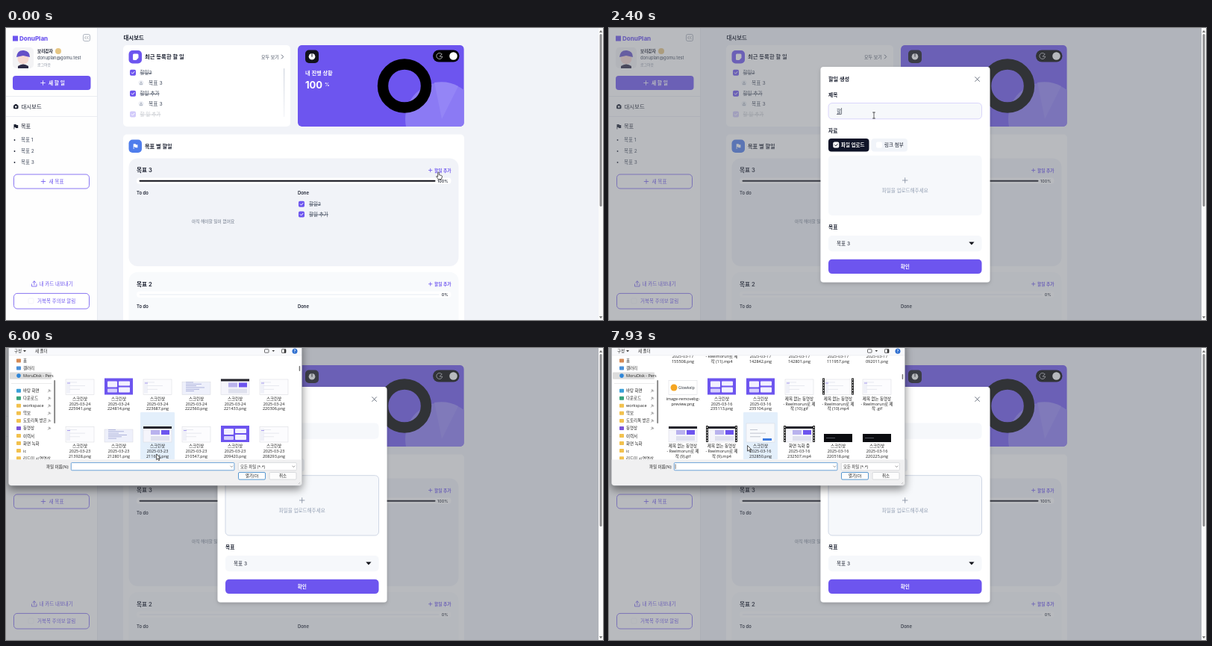
Write an HTML page that moves like this. It is 800x391 px and loops after 8000 ms.

```html
<!DOCTYPE html>
<html lang="ko">
<head>
<meta charset="utf-8">
<title>할일 추가</title>
<style>
  html, body { margin: 0; width: 100%; height: 100%; overflow: hidden; background: #f1f3f8; }
  svg { display: block; width: 100%; height: 100%; }
  text { font-family: Inter, "Noto Sans CJK KR", "Noto Sans CJK", sans-serif; white-space: pre; }
  #dialog text { font-family: "Open Sans", "Noto Sans CJK KR", "Noto Sans CJK", sans-serif; }
  .strike { text-decoration: line-through; }
  #modal { transform-origin: 397px 196px; }
</style>
</head>
<body>
<svg id="stage" viewBox="0 0 800 391" preserveAspectRatio="none"></svg>
<script>
const PURPLE = '#6d55ef', INK = '#1b2030', SLATE = '#3c4658', MUTED = '#94a0b4', FIELD = '#f6f8fb';
const LOOP = 8000, ROW = 63.5, COL = 52;

// Drawing helpers; text is placed by its vertical centre.
const rect = (x, y, w, h, r, fill, extra = '') =>
  `<rect x="${x}" y="${y}" width="${w}" height="${h}" rx="${r}" fill="${fill}" ${extra}/>`;
const circle = (x, y, r, fill, extra = '') =>
  `<circle cx="${x}" cy="${y}" r="${r}" fill="${fill}" ${extra}/>`;
const fillPath = (d, fill, extra = '') => `<path d="${d}" fill="${fill}" ${extra}/>`;
const line = (d, stroke, w = 0.8, extra = '') =>
  `<path d="${d}" fill="none" stroke="${stroke}" stroke-width="${w}" stroke-linecap="round" stroke-linejoin="round" ${extra}/>`;
const text = (x, y, s, size, fill = INK, weight = 400, extra = '') =>
  `<text x="${x}" y="${y + size * 0.37}" font-size="${size}" fill="${fill}" font-weight="${weight}" ${extra}>${s}</text>`;
const middle = 'text-anchor="middle"';
const outline = (c, w = 0.8) => `stroke="${c}" stroke-width="${w}"`;
const plus = (x, y, c, r = 2.8) => line(`M${x - r} ${y}h${2 * r}M${x} ${y - r}v${2 * r}`, c);
const check = (x, y, size = 8) =>
  rect(x - size / 2, y - size / 2, size, size, 1.8, PURPLE) +
  line(`M${x - 1.8} ${y}l1.4 1.4 2.4-2.7`, '#fff', 1);
const flag = (x, y, c) => fillPath(`M${x - 2.5} ${y - 3}h3l.5 1h2.2v4h-3l-.5-1h-1.4v2.6h-.8z`, c);

function sidebar() {
  const goals = [1, 2, 3].map((n, i) =>
    circle(11.5, 150 + 15 * i, 0.9, INK) + text(20, 150 + 15 * i, '목표 ' + n, 6.5, SLATE)).join('');
  return rect(0, 0, 122, 391, 0, '#fefefe') + rect(122, 0, 0.7, 391, 0, '#e2e6ee') +
    rect(9, 10.5, 7, 7, 0, PURPLE) + text(18, 13.8, 'DonuPlan', 8, PURPLE, 800) +
    rect(103.5, 8.5, 9, 9, 2, '#fff', outline('#8d95a5', 0.7)) +
    line('M107.5 11l-2 2 2 2M110.5 11l-2 2 2 2', '#6b7280', 0.6) +
    rect(9, 26, 28, 28, 5, '#f3f3f5') + circle(23, 41, 7.5, '#f6d9d2') +
    fillPath('M14 39q1-10 10-9q8 1 8 9l-9-2z', '#6350c8') + fillPath('M16 51q7-5 14 0v3h-14z', '#2d2a45') +
    text(42, 30.5, '보리감자', 5.6, INK, 600) + circle(70, 31, 4, '#e6c684') +
    text(42, 40, 'donuplan@gomu.test', 5.8, SLATE) + text(42, 49, '로그아웃', 4.9, '#8b93a3') +
    rect(9, 64, 104.5, 19, 4, PURPLE) + plus(49.5, 73.5, '#fff') + text(57, 73.5, '새 할 일', 6.7, '#fff', 600) +
    rect(0, 91, 122, 0.8, 0, '#e6e9ef') + rect(0, 118, 122, 0.8, 0, '#e6e9ef') +
    rect(10, 103, 6.5, 5.3, 1.5, INK) + rect(11.6, 102, 3.3, 2, 0.7, INK) + circle(13.2, 105.5, 1.3, '#fff') +
    text(20.5, 105, '대시보드', 7.4, INK, 500) +
    flag(13, 132, INK) + text(20, 131.8, '목표', 7.2, INK, 500) + goals +
    rect(10.5, 196, 101, 19, 4.5, '#fff', outline(PURPLE)) + plus(50, 205.5, PURPLE) +
    text(57.5, 205.5, '새 목표', 6.6, PURPLE, 500) +
    line('M34.5 343v3h6.5v-3M37.8 344v-5M35.7 341l2.1-2.1 2.1 2.1', PURPLE) +
    text(44.5, 342.5, '내 카드 내보내기', 6.5, PURPLE, 500) +
    rect(10.5, 355.4, 101, 20.6, 4.5, '#fff', outline(PURPLE)) + rect(30, 362, 7, 7, 1.5, '#fff', outline('#eceff5', 0.6)) +
    text(42, 365.5, '거북목 주의보 알림', 6.5, PURPLE, 500);
}

function recentCard() {
  const task = (y, s) => check(170, y) + text(179.5, y, s, 6.55, SLATE, 400, 'class="strike"');
  const goal = y => circle(181, y, 3.6, '#eef0f5') + line(`M179.5 ${y + 1.5}l1.5-3.3 1.5 3.3z`, '#8b95a7', 0.6) +
    text(191, y, '목표 3', 6.8, SLATE);
  return rect(157, 23, 224, 109, 5, '#fff') + rect(164.5, 30, 17.5, 17.5, 5, PURPLE) +
    fillPath('M170 36q0-1.5 1.5-1.5h4.5q1.5 0 1.5 1.5v4l-3 3h-3q-1.5 0-1.5-1.5z', '#fff') +
    text(186, 38.3, '최근 등록한 할 일', 7.35, INK, 600) +
    text(342, 38.5, '모두 보기', 6, SLATE, 500) + line('M369.3 36l2.4 2.5-2.4 2.5', SLATE) +
    task(59.8, '할일2') + goal(73.6) + task(87.8, '할일 추가') + goal(101.6) +
    `<g opacity=".3">${task(115.6, '할 일 추가')}</g>` +
    rect(372, 54, 1.2, 65, 0.6, 'url(#bar)');
}

function progressCard() {
  return `<g clip-path="url(#card)">` + rect(391, 23, 223, 109, 5, PURPLE) +
    circle(584, 122, 49, '#8b7af4') + fillPath('M584 122L574 73Q592 70 606 78z', '#9485f6') + '</g>' +
    rect(401, 29.5, 18, 17.5, 5, '#12121c') + circle(410, 38.3, 4.3, '#fff') + line('M410 38.3v-4', '#12121c', 1) +
    text(401, 60, '내 진행 상황', 7.2, '#fff', 600) +
    text(401, 76, '100', 13, '#fff', 700) + text(427, 75.5, '%', 6.6, '#fff', 600) +
    circle(534, 77.5, 29, 'none', outline('#000', 14.4)) +
    rect(572, 29.5, 35.5, 16, 8, '#000') + circle(599.5, 37.5, 5.3, '#fff') +
    line('M584 35a4 4 0 1 0 .8 3.2h-3.6l2.8-3.2', '#e8e8ee', 0.7);
}

function goalPanel(y, h, title, percent, fill) {
  const done = percent === 100;
  return rect(164.5, y, 442, h, 12, fill) + text(175, y + 16, title, 7.6, INK, 600) +
    plus(568.7, y + 16, PURPLE, 2.2) + text(574, y + 16, '할일 추가', 5.7, PURPLE, 600) +
    rect(175, y + 26, 421.5, 8.3, 4.1, '#fff') +
    rect(178.5, y + 29.2, done ? 397 : 402, 2, 1, done ? '#0c0c16' : '#f3f5f9') +
    text(592.5, y + 30.1, percent + '%', 5.4, INK, 500, 'text-anchor="end"') +
    text(175, y + 46, 'To do', 5.9, INK, 600) + text(391, y + 46, 'Done', 5.9, INK, 600);
}

function goalsCard() {
  const task = (y, s) => check(396, y) + text(406, y, s, 6.5, SLATE, 400, 'class="strike"');
  return rect(157, 142.5, 457, 260, 5, '#fff') + rect(164.5, 149.5, 17.5, 17.5, 5, '#4f7dec') + flag(173.2, 158.3, '#fff') +
    text(186, 158, '목표 별 할일', 7.2, INK, 600) +
    goalPanel(174.5, 144.5, '목표 3', 100, '#f1f3f8') +
    text(249, 258.8, '아직 해야할 일이 없어요', 5.7, '#6a7486') +
    task(235.8, '할일2') + task(249.6, '할일 추가') +
    goalPanel(326.8, 90, '목표 2', 0, '#f8fafc');
}

function modal() {
  const label = (y, s) => text(294, y, s, 6.7, INK, 600);
  return rect(283.5, 52, 227, 288.6, 4, '#fff', 'filter="url(#soft)"') + text(294, 68.5, '할일 생성', 7.2, INK, 700) +
    line('M490.7 65.7l5.8 5.8M496.5 65.7l-5.8 5.8', '#4a5262') +
    label(90, '제목') + rect(294, 100.5, 205.5, 21.3, 5, FIELD, 'id="field"') +
    text(305, 111.3, '', 6.55, MUTED, 400, 'id="entry"') +
    rect(0, 107, 0.6, 8.5, 0, INK, 'id="caret"') + rect(305, 115.2, 6, 0.6, 0, INK, 'id="compose"') +
    label(138, '자료') + rect(294, 148, 54.5, 17.5, 4, '#0f1428') + rect(300.3, 152.6, 8, 8, 2, '#fff') +
    line('M302.5 156.6l1.4 1.5 2.4-2.9', '#0f1428', 0.9) + text(311, 156.6, '파일 업로드', 6.5, '#fff', 600) +
    rect(351.5, 148, 48.5, 17.5, 4, '#f1f4f9') + rect(358, 152.6, 8, 8, 2, '#fff') + text(369, 156.6, '링크 첨부', 6.5, INK, 500) +
    rect(294, 170.7, 205.5, 80.3, 5, FIELD, 'id="drop"') + plus(396.7, 204, '#7b8699', 3.3) +
    text(396.7, 218, '파일을 업로드해주세요', 6.55, MUTED, 500, middle) +
    label(267, '목표') + rect(294, 278, 205.5, 21.3, 5, FIELD) + text(305, 288.5, '목표 3', 6.6, INK) +
    fillPath('M482.3 286.6h7.2l-3.6 4z', '#0d0f18') +
    rect(294, 309.8, 205.5, 19.3, 5, PURPLE, 'id="submit"') + text(396.7, 319.4, '확인', 6.6, '#fff', 600, middle);
}

// File rows: "kind day time", or "kind clip suffix" for exported videos.
const fileRows = [
  null, null,
  'shot 22 163718,shot 22 143153,shot 21 180939,shot 21 170152,shot 21 143538,shot 21 140340',
  'poster 21 135738,shot 21 024749,pdf,shot 20 191040,strip 20 185904,dense 20 185855',
  'shot 20 185152,shot 20 182602,black 20 174617,pink 20 145903,poster 20 140602,notes 18 173734',
  null, null, null,
  'shot 17 155508,film clip (11).mp4,shot 17 142842,shot 17 142801,shot 17 111957,shot 17 092011',
  'logo,violet 16 235113,violet 16 235104,shot clip (10).gif,film clip (10).mp4,shot clip .gif',
  'app clip (9).gif,appfilm clip (9).mp4,prompt 16 232850,appfilm rec 232507,dark 16 220518,dark 16 220225',
];
const fillerRow = r => Array.from({ length: 6 }, (_, c) =>
  `${['shot', 'violet', 'shot', 'dense', 'app'][(r * 2 + c) % 5]} ${r < 2 ? 24 - r : 18} ${225941 - r * 12013 - c * 1127}`).join();

function thumb(kind, x, y) {
  const box = (w, h, fill, extra = '') => rect(x - w / 2, y - h, w, h, 0, fill, extra);
  const edge = outline('#d5d8de', 0.5);
  const lines = (n, c) => Array.from({ length: n }, (_, i) =>
    rect(x - 14, y - 17 + i * 14 / n, 10 + (i * 11) % 18, 0.9, 0, c)).join('');
  const app = box(38, 21, '#f5f5fb', edge) + rect(x - 19, y - 21, 38, 3, 0, '#25252c') +
    rect(x - 9, y - 16, 12, 6, 0, '#b9b2ee') + rect(x + 5, y - 16, 11, 6, 0, PURPLE) + rect(x - 9, y - 8, 25, 6, 0, '#dfe1ee');
  const film = inner => inner + [-21, 18].map(dx => rect(x + dx, y - 22, 3, 22, 0, '#222') +
    line(`M${x + dx + 1.5} ${y - 20.5}v19.5`, '#eee', 1.2, 'stroke-dasharray="1 2.6"')).join('');
  const shot = box(38, 20.5, '#fcfcfe', edge) + rect(x - 18, y - 18, 5, 16, 0, '#f0f1f8') +
    lines(3, '#e4e6ee') + rect(x - 17, y - 16, 4, 1, 0, '#a99cf0');
  switch (kind) {
    case 'poster': return box(29, 38, '#a98a5e') + rect(x - 12, y - 35, 14, 4, 0, '#4c4038') +
      fillPath(`M${x - 14} ${y - 15}l13-11 15 9-13 12z`, '#59677f') + fillPath(`M${x - 10} ${y - 15}l9-7 9 6-9 8z`, '#cfbd93') +
      rect(x - 13, y - 6, 26, 4, 0, '#6f4c38') + circle(x + 9, y - 30, 3, '#b9654a');
    case 'pdf': return fillPath(`M${x - 14} ${y - 38}h20l8 8v30h-28z`, '#f7f7f8', edge) + circle(x, y - 19, 11, '#dd5144') +
      rect(x - 10, y - 16, 20, 8, 1, '#3b3b3f') + text(x, y - 12, 'PDF', 7, '#fff', 700, middle);
    case 'strip': return box(38, 6, '#f5f6fa', edge);
    case 'black': return box(38, 5, '#111');
    case 'dark': return box(38, 11, '#0b0c10') + rect(x - 16, y - 6, 12, 0.8, 0, '#656a72');
    case 'dense': return box(38, 17, '#eef0fb', edge) + lines(6, '#a6acd8');
    case 'pink': return box(38, 19, '#f3e8f0', edge) + rect(x + 3, y - 17, 14, 14, 0, '#bd93b8') + lines(3, '#d99bbb');
    case 'notes': return box(38, 28, '#fffef6', edge) + rect(x - 16, y - 26, 24, 2, 0, '#f0d848') + lines(6, '#858299') +
      rect(x - 14, y - 10, 20, 1.5, 0, '#f0d848');
    case 'violet': return box(38, 22, PURPLE) + rect(x - 15, y - 18, 13, 8, 1, '#f2f0ff') + rect(x, y - 18, 15, 6, 1, '#f2f0ff') +
      rect(x - 15, y - 8, 13, 5, 1, '#d5ceff') + rect(x, y - 10, 15, 7, 1, '#f2f0ff');
    case 'logo': return box(38, 19, '#fff', edge) + circle(x - 12, y - 9.5, 4.5, '#f5a623') + text(x - 6, y - 9.5, 'Glowkelp', 4.9, '#5a5f66', 600);
    case 'prompt': return box(38, 25, '#f7f9fc', edge) + lines(3, '#b9bfca') + rect(x + 3, y - 5, 12, 3, 0, '#3f7be0');
    case 'film': return film(shot);
    case 'app': return app;
    case 'appfilm': return film(app);
    default: return shot;
  }
}

function fileLabel([kind, group, tail]) {
  if (kind === 'pdf') return ['수료증_나도담.pdf'];
  if (kind === 'logo') return ['image-removebg-', 'preview.png'];
  if (group === 'clip') return ['제목 없는 동영상', '- Reelmorun로 제', '작 ' + tail];
  if (group === 'rec') return ['화면 녹화 중', '2025-03-16', tail + '.mp4'];
  return ['스크린샷', '2025-03-' + group, tail + '.png'];
}

const files = () => fileRows.map((row, r) => (row || fillerRow(r)).split(',').map((cell, c) => {
  const parts = cell.split(' '), x = 99 + c * COL, y = 62.5 + r * ROW;
  return thumb(parts[0], x, y) + fileLabel(parts).map((s, i) => text(x, y + 5.4 + 6.6 * i, s, 5.5, '#1c1c1c', 400, middle)).join('');
}).join('')).join('');

function dialog() {
  const places = ['홈', '갤러리', 'MoruDisk - Perso', '', '바탕 화면', '다운로드', 'workspace', '악보', '도토리톡 받은', '동영상', '이력서', '화면 녹화', 'ic', '리드미 시연영상'];
  const tints = ['#d58a55', '#4a90d9', '#2f86d8', '', '#3aa0d8', '#37a37c', '#f2c14e', '#f2c14e', '#f2c14e', '#7b55d9', '#f2c14e', '#f2c14e', '#f2c14e', '#f2c14e'];
  const side = places.map((s, i) => {
    if (!s) return rect(7, 47.3, 54, 0.6, 0, '#dedede');
    const y = 17 + i * 10.05, pin = i > 3 && i < 10 ? line(`M56.5 ${y + 1.8}l1.6-1.6M57 ${y - 1}l2 2M58 ${y - 1.6}l1.7 1.7`, '#777', 0.8) : '';
    const icon = i === 2 ? circle(17, y, 2.8, tints[i]) : rect(14, y - 2.5, 6, 5, 0.8, tints[i]);
    return (i === 2 ? rect(5, y - 4.7, 56, 9.4, 1, '#dcdcdc') : '') + icon + text(23, y, s, 5.5, '#222') + pin;
  }).join('');
  const button = (x, s, border) => rect(x, 166.5, 36, 9.6, 1.5, '#fdfdfd', outline(border, 0.8)) + text(x + 18, 171.2, s, 5.5, '#222', 400, middle);
  return rect(3.5, -10, 393, 194, 4, '#fff', outline('#9a9ca3', 0.5) + ' filter="url(#shadow)"') +
    `<g clip-path="url(#side)">${side}</g>` + rect(64.2, 43, 1.9, 58, 0.9, '#858585') +
    `<g clip-path="url(#files)"><g id="list">${rect(0, 0, 46, 63.5, 1, '#e3effb', 'id="hover"')}${files()}</g></g>` +
    rect(392.7, 27, 1.5, 7, 0.7, '#777', 'id="thumb"') +
    rect(4, -4, 392, 13.6, 0, '#f8f9fc') + rect(4, 9.6, 392, 0.6, 0, '#e4e6ea') +
    text(11, 4, '구성', 5.5, '#222') + fillPath('M23 3h4l-2 2.3z', '#333') + text(39, 4, '새 폴더', 5.5, '#222') +
    rect(346.5, 1.8, 5.5, 4.4, 0.6, 'none', outline('#333', 0.7)) + fillPath('M356.5 3h3.6l-1.8 2z', '#333') +
    rect(369.5, 1.7, 5.5, 4.8, 0.5, 'none', outline('#333', 0.7)) + rect(372.8, 1.7, 2.2, 4.8, 0, '#333') +
    circle(387, 4.2, 3.5, '#2f6fd0') + text(387, 4.2, '?', 5, '#fff', 700, middle) +
    fillPath('M3.7 149.5H396.3V180q0 4-4 4H7.7q-4 0-4-4z', '#f0f0f1') +
    text(84.5, 158.6, '파일 이름(N):', 5.5, '#222', 400, 'text-anchor="end"') +
    rect(87.3, 153.6, 218.6, 10.2, 1, '#fff', outline('#4b8fd0', 0.8)) + line('M300.8 158l1.5 1.5 1.5-1.5', '#555', 0.6) +
    rect(88.8, 155.5, 0.6, 6.5, 0, '#222', 'id="nameCaret"') +
    rect(311.3, 153.6, 78, 10.2, 1, '#fff', outline('#cfd1d5', 0.7)) + text(314, 158.6, '모든 파일 (*.*)', 5.4, '#222') +
    line('M384 158l1.5 1.5 1.5-1.5', '#555', 0.6) + button(311.5, '열기(O)', '#2f7fc6') + button(353, '취소', '#cfd1d5') +
    line('M392 182l2-2M394 182.2l.3-.3', '#aaa', 0.6);
}

const clip = (id, x, y, w, h, r = 0) => `<clipPath id="${id}">${rect(x, y, w, h, r, '#000')}</clipPath>`;
const shadow = (id, dy, blur, opacity) => `<filter id="${id}" x="-15%" y="-15%" width="130%" height="140%">
  <feDropShadow dx="0" dy="${dy}" stdDeviation="${blur}" flood-opacity="${opacity}"/></filter>`;
const pointers = {
  arrow: fillPath('M0 0v7.6l1.8-1.6 1.2 2.6 1.2-.6-1.2-2.5h2.4z', '#fff', outline('#111', 0.7)),
  hand: fillPath('M-.8 0q.9-.8 1.6 0v3.2l3.4.8q.9.3.7 1.4l-.8 3.6h-4.2l-2.8-3.6q.3-1 1.3-.4l.8.7z', '#fff', outline('#111', 0.7)),
  beam: line('M-1.5-4h3M0-4v8M-1.5 4h3', '#222', 0.7),
};

document.getElementById('stage').innerHTML =
  `<defs>${clip('card', 391, 23, 222.6, 109, 5)}${clip('files', 67, 9.8, 325, 139.7)}${clip('side', 4, 10, 60, 139.5)}
  <linearGradient id="bar" x2="0" y2="1"><stop stop-color="#cfd4df"/><stop offset="1" stop-color="#f3f5f8"/></linearGradient>
  ${shadow('shadow', 5, 6, 0.48)}${shadow('soft', 2, 2.5, 0.18)}</defs>` +
  rect(0, 0, 800, 391, 0, '#f1f3f8') + sidebar() + text(157.5, 13, '대시보드', 7.45, INK, 600) +
  recentCard() + progressCard() + goalsCard() +
  rect(0, 0, 794, 391, 0, '#686c76', 'id="shade"') + `<g id="modal">${modal()}</g><g id="dialog">${dialog()}</g>` +
  rect(794, 0, 6, 391, 0, '#fafafa') + rect(795.6, 8, 3, 231, 1.5, '#8b8b8d') +
  fillPath('M795 6l2.1-3.2 2.1 3.2zM795 386l2.1 3.2 2.1-3.2z', '#777') +
  Object.entries(pointers).map(([k, s]) => `<g id="${k}">${s}</g>`).join('');

const el = id => document.getElementById(id);
const show = (id, on) => el(id).setAttribute('visibility', on ? 'visible' : 'hidden');
const set = (id, attrs) => Object.entries(attrs).forEach(([k, v]) => el(id).setAttribute(k, v));
const clamp = v => Math.min(1, Math.max(0, v));

// Eased interpolation through [time, ...values] stops.
function track(stops, t) {
  const i = stops.findIndex(s => s[0] > t);
  if (i < 0) return stops.at(-1).slice(1);
  if (i === 0) return stops[0].slice(1);
  const a = stops[i - 1], b = stops[i], u = (t - a[0]) / (b[0] - a[0]), e = u * u * (3 - 2 * u);
  return a.slice(1).map((v, k) => v + (b[k + 1] - v) * e);
}
const latest = (stops, t) => stops.filter(s => s[0] <= t).at(-1)[1];

const pointerPath = [[0, 579.5, 193.5], [930, 579.5, 193.5], [1100, 580, 193], [1330, 580, 193], [1930, 355, 117], [2800, 355, 117],
  [3130, 357, 140], [4470, 357, 140], [5130, 384, 216], [5730, 384, 216], [6200, 87, 95.5], [7100, 87, 95.5], [7800, 185.5, 130.5]];
const pointerKind = [[0, 'hand'], [960, 'arrow'], [1860, 'beam'], [3000, 'arrow'], [4800, 'hand'], [5670, 'arrow']];
const scrollPath = [[6200, 0], [6400, 3 * ROW], [6930, 3 * ROW], [7060, 5 * ROW], [7270, 5 * ROW], [7400, 7 * ROW], [7600, 7 * ROW], [7730, 9 * ROW]];
const typing = [[0, ''], [2200, 'ㅎ'], [2260, '하'], [2330, '할'], [2530, '할ㅇ'], [2600, '할이'], [2730, '할일'], [3330, '할일ㄹ'], [3800, '할일'], [4060, '할일3']];

function render(t) {
  const u = clamp((t - 965) / 220), open = 1 - (1 - u) ** 2;
  set('shade', { opacity: 0.47 * clamp(open * 1.15) });
  set('modal', { opacity: open });
  el('modal').style.transform = `scale(${0.97 + 0.03 * open})`;

  const value = latest(typing, t), focus = t < 5330 ? clamp((t - 2250) / 450) : 0, entry = el('entry');
  entry.textContent = value || '할일 제목을 적어주세요.';
  entry.setAttribute('fill', value ? SLATE : MUTED);
  const width = value ? entry.getComputedTextLength() : 0, composing = value && t < 3800;
  set('field', { stroke: PURPLE, 'stroke-width': 0.9, 'stroke-opacity': 0.75 * focus });
  set('caret', { x: 305.4 + width });
  show('caret', t > 2100 && t < 5330 && (t - 2300) % 1060 < 530);
  set('compose', { x: 305 + width - 6 });
  show('compose', composing);
  set('submit', { fill: value ? PURPLE : '#9a9db2' });
  set('drop', { stroke: '#cbd3e3', 'stroke-width': t > 4950 ? 0.9 : 0 });

  const [x, y] = track(pointerPath, t), kind = latest(pointerKind, t);
  for (const k in pointers) show(k, k === kind);
  set(kind, { transform: `translate(${x} ${y})` });

  const [scroll] = track(scrollPath, t);
  el('dialog').style.display = t >= 5670 ? '' : 'none';
  set('list', { transform: `translate(0 ${-scroll})` });
  set('thumb', { y: 24 + scroll / 52 });
  const col = Math.floor((x - 73) / COL), row = Math.floor((y + scroll - 22) / ROW);
  set('hover', { x: 76 + col * COL, y: 22.5 + row * ROW });
  show('hover', x > 73 && x < 385 && y > 10 && y < 149);
  show('nameCaret', (t - 5670) % 1060 > 530 || t > 7800);
}

const start = performance.now();
(function frame() {
  render((performance.now() - start) % LOOP);
  requestAnimationFrame(frame);
})();
</script>
</body>
</html>
```
